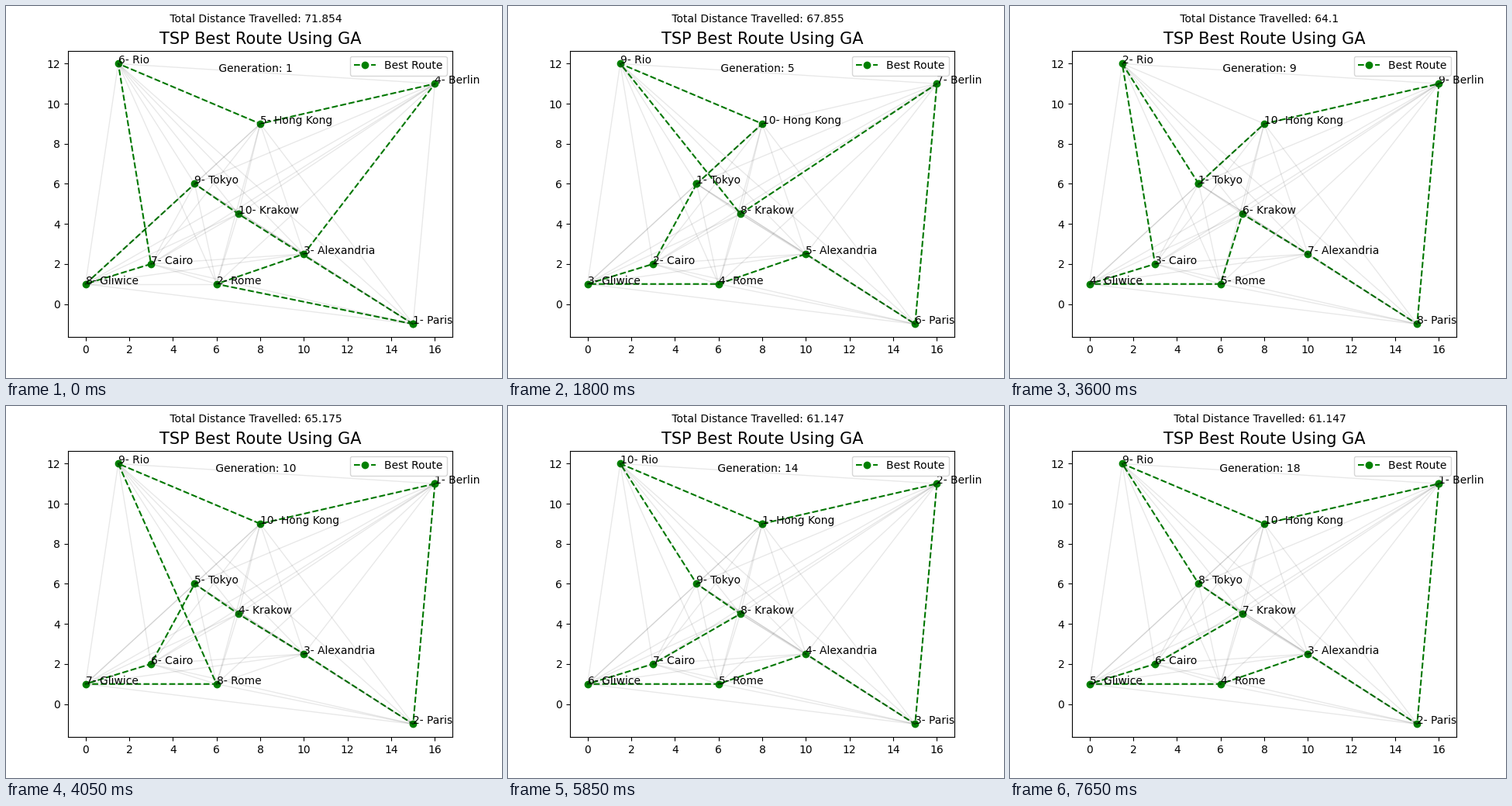
Write a matplotlib script that moves like this. It is 640 px wide and 480 px high and loops after 8 s.

```python
from itertools import combinations
from math import dist

import matplotlib.pyplot as plt
from matplotlib.animation import FuncAnimation

CITIES = {
    "P": ("Paris", 15, -1),
    "R": ("Rome", 6, 1),
    "A": ("Alexandria", 10, 2.5),
    "B": ("Berlin", 16, 11),
    "H": ("Hong Kong", 8, 9),
    "I": ("Rio", 1.5, 12),
    "C": ("Cairo", 3, 2),
    "G": ("Gliwice", 0, 1),
    "T": ("Tokyo", 5, 6),
    "K": ("Krakow", 7, 4.5),
}

# Best route of each generation, one city key per stop
ROUTES = """
    PRABHICGTK BHICGTKARP BPARTICGKH TCGRAPKBHI TCGRAPBKIH BPAGCRKTIH
    BPARCGTKIH TICGRKAPBH TICGRKAPBH BPAKTCGRIH BPARGCTIKH BPARGCTKIH
    KBPARGCTIH HBPARGCKTI HBPARGCKTI BPARGCKTIH BPARGCKTIH BPARGCKTIH
""".split()

LOOP_MS = 8000
STEP_MS = 50
GENERATION_MS = 450


def point(key):
    return CITIES[key][1:]


def route_points(route):
    return [point(key) for key in route + route[0]]


def length(points):
    return sum(dist(a, b) for a, b in zip(points, points[1:]))


fig, ax = plt.subplots(figsize=(6.4, 4.8), dpi=100)

route_line, = ax.plot(*zip(*route_points(ROUTES[0])), "--go", label="Best Route")
ax.legend(loc="upper right")

for a, b in combinations(CITIES, 2):
    ax.plot(*zip(point(a), point(b)), "k-", alpha=0.09, linewidth=1)

ax.set_title("TSP Best Route Using GA", fontsize=15)
header = fig.suptitle("", fontsize=10)
labels = {key: ax.annotate("", point(key), fontsize=10) for key in CITIES}


def update(frame):
    gen = frame * STEP_MS // GENERATION_MS
    route = ROUTES[gen]
    points = route_points(route)
    route_line.set_data(*zip(*points))
    for stop, key in enumerate(route, 1):
        labels[key].set_text(f"{stop}- {CITIES[key][0]}")
    total = round(length(points), 3)
    header.set_text(
        f" Total Distance Travelled: {total}\n\n\n\n Generation: {gen + 1}"
    )
    return [route_line, header, *labels.values()]


anim = FuncAnimation(
    fig, update, frames=LOOP_MS // STEP_MS, interval=STEP_MS,
    repeat=True, repeat_delay=0,
)
plt.show()
```
